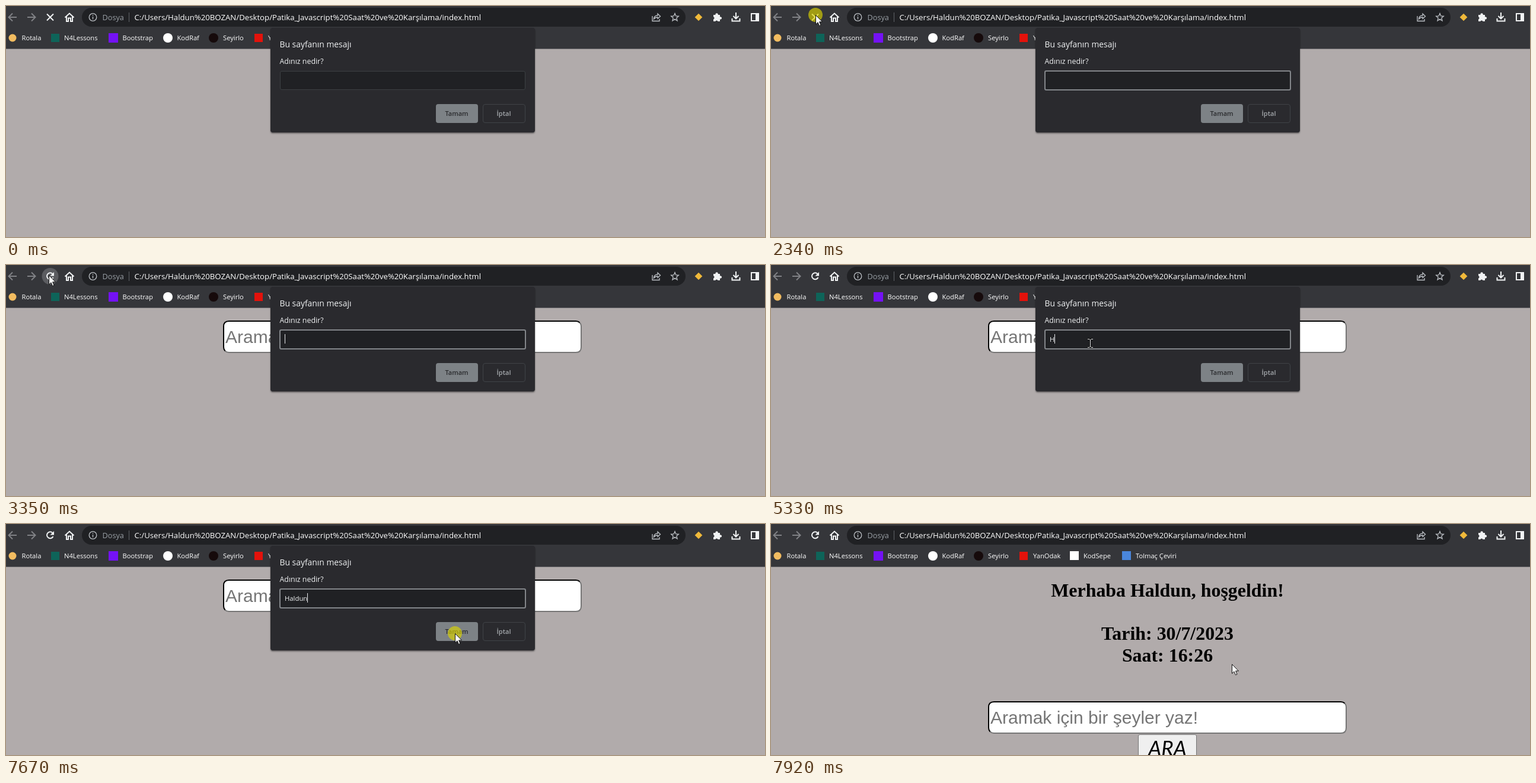
Recreate the animation shown at these times as an HTML page. Size 1280 px wide and 391 px high, loop 7990 ms.

```html
<!DOCTYPE html>
<html lang="tr">
<head>
<meta charset="utf-8">
<title>Saat ve Karşılama</title>
<style>
  html, body { margin: 0; width: 100%; height: 100%; overflow: hidden; background: #b1abab; }
  svg { display: block; font-family: "Open Sans", "Noto Sans", sans-serif; }
  .line { fill: none; stroke: #f1f3f4; stroke-width: 2; }
  .dim { stroke: #808185; }
  .thin { stroke: #bdc1c6; stroke-width: 1.3; }
  .dark { stroke: #000; }
  .gray { stroke: #767676; }
  .marks { font-size: 11.2px; fill: #fff; }
  .greet { font: bold 31.9px "Liberation Serif", serif; text-anchor: middle; }
  .btn { font-size: 11px; font-weight: 600; text-anchor: middle; }
</style>
</head>
<body>
<svg width="1280" height="391" viewBox="0 0 1280 391">
  <defs>
    <filter id="shadow" x="-5%" y="-5%" width="110%" height="115%">
      <feDropShadow dx="0" dy="1.5" stdDeviation="1.3" flood-opacity=".5"/>
    </filter>
  </defs>
  <rect width="1280" height="391" fill="#b1abab"/>

  <g id="page">
    <g id="greeting" class="greet">
      <text x="668.5" y="123">Merhaba Haldun, hoşgeldin!</text>
      <text x="668.5" y="196">Tarih: 30/7/2023</text>
      <text x="668.5" y="233">Saat: 16:26</text>
    </g>
    <g id="search">
      <rect x="367" y="95" width="603" height="53" rx="9" fill="#fff"/>
      <path class="line gray" d="M967.5 97.5Q970 100 970 104V139Q970 148 961 148H376Q372 148 369.5 145.5"/>
      <path class="line dark" d="M369.5 145.5Q367 143 367 139V104Q367 95 376 95H961Q965 95 967.5 97.5"/>
      <text x="370" y="132" font-size="30" fill="#757575" font-family="Liberation Sans, sans-serif">Aramak için bir şeyler yaz!</text>
      <rect x="619.5" y="150.5" width="98" height="48" rx="2.5" fill="#efefef" stroke="#767676"/>
      <text x="668.5" y="186" font-size="35" font-style="italic" text-anchor="middle" font-family="Lato, sans-serif">ARA</text>
    </g>
  </g>

  <g id="toolbar">
    <rect width="1280" height="72" fill="#35363a"/>
    <rect y="72" width="1280" height="1" fill="#67666a"/>
    <path class="line dim" d="M18 19H5M11 12.5L4.5 19L11 25.5M36 19H49M43 12.5L49.5 19L43 25.5"/>
    <circle id="hover" cx="74.5" cy="19" r="14" fill="#5b5c60"/>
    <path id="stop" class="line" d="M69 13.5L80 24.5M80 13.5L69 24.5"/>
    <g id="reload">
      <path class="line" d="M79.5 21A5.5 5.5 0 1 1 78.5 15"/>
      <path fill="#f1f3f4" d="M81 12V18.5H74.5Z"/>
    </g>
    <path class="line" d="M99.5 19.5L107 12.5L114.5 19.5M102 18V26H105V20.5H109V26H112V18"/>
    <rect x="128" y="3" width="1018" height="32" rx="16" fill="#202124"/>
    <circle class="line thin" cx="146.5" cy="19" r="6.3"/>
    <path class="line thin" d="M146.5 18V22.5M146.5 15V16.5"/>
    <text x="162.5" y="23.5" font-size="12.7" fill="#9aa0a6">Dosya</text>
    <rect x="207" y="11" width="1" height="16" fill="#5f6368"/>
    <text x="216.5" y="23.5" font-size="13.21" fill="#fff">C:/Users/Haldun%20BOZAN/Desktop/Patika_Javascript%20Saat%20ve%20Karşılama/index.html</text>
    <path class="line thin" d="M1090 17V25.5H1102V22M1092.5 22Q1093 16 1099 16V13L1103.5 17.5L1099 21.5V19Q1095 19 1092.5 22Z"/>
    <path class="line thin" d="M1128 12.5L1129.8 17L1134.3 17.3L1130.8 20.2L1132 25L1128 22.3L1124 25L1125.2 20.2L1121.7 17.3L1126.2 17Z"/>
    <rect x="1163.5" y="14.5" width="9" height="9" fill="#f0b93a" transform="rotate(45 1168 19)"/>
    <path fill="#f1f3f4" d="M1193 15H1196.5A2.2 2.2 0 1 1 1200.7 15H1204V18.5A2.2 2.2 0 1 1 1204 22.5V26H1200.5A2.2 2.2 0 0 0 1196.3 26H1193V22.5A2.2 2.2 0 0 0 1193 18.3Z"/>
    <path class="line" d="M1231 11V21M1226.5 17L1231 21.5L1235.5 17M1224.5 21V25.5H1237.5V21"/>
    <rect class="line" x="1257" y="13" width="12" height="12"/>
    <rect x="1264" y="13" width="5" height="12" fill="#f1f3f4"/>
    <circle cx="11" cy="54" r="6.5" fill="#f2bc60"/>
    <rect x="76" y="47" width="14" height="14" fill="#0e6459"/>
    <rect x="173" y="46" width="16" height="16" fill="#7412f5"/>
    <circle cx="273" cy="54" r="8" fill="#fff"/>
    <circle cx="350" cy="54" r="8" fill="#160a0b"/>
    <rect x="419" y="47" width="14" height="14" fill="#e3120b"/>
    <rect x="504" y="46" width="15" height="15" fill="#fff"/>
    <rect x="592" y="46" width="15" height="15" fill="#4a86dc"/>
    <g class="marks">
      <text x="26.5" y="58">Rotala</text>
      <text x="98" y="58">N4Lessons</text>
      <text x="196.5" y="58">Bootstrap</text>
      <text x="288.5" y="58">KodRaf</text>
      <text x="366" y="58">Seyirlo</text>
      <text x="442" y="58">YanOdak</text>
      <text x="527" y="58">KodSepe</text>
      <text x="615" y="58">Tolmaç Çeviri</text>
    </g>
  </g>

  <g id="dialog">
    <rect x="446" y="37" width="446" height="177" rx="4" fill="#292a2d" filter="url(#shadow)"/>
    <text x="461.5" y="69.5" font-size="13.87" fill="#f1f3f4">Bu sayfanın mesajı</text>
    <text x="461.5" y="97.5" font-size="12.4" fill="#f1f3f4">Adınız nedir?</text>
    <rect x="462.5" y="110.5" width="413" height="31" rx="2.5" fill="#202124" stroke="#3c4043"/>
    <rect id="ring" x="462" y="110" width="414" height="32" rx="2" fill="none" stroke="#83868a" stroke-width="2"/>
    <text id="typed" x="470" y="130" font-size="11.3" fill="#f1f3f4"></text>
    <rect id="caret" y="117" width="1" height="16" fill="#e8eaed"/>
    <rect x="725" y="166" width="71" height="32" rx="4" fill="#7d8286"/>
    <text class="btn" x="760" y="186" fill="#292a2d">Tamam</text>
    <rect x="804.5" y="166.5" width="71" height="31" rx="3.5" fill="none" stroke="#404347"/>
    <text class="btn" x="839.5" y="186" fill="#a6aaae">İptal</text>
  </g>

  <g id="pointer">
    <circle id="press" r="12" fill="#dcd400" opacity=".65"/>
    <path id="arrow" fill="#fff" stroke="#111" d="M.5 .5V16L4 12.7L6.5 18.5L9 17.4L6.6 11.8H11.5Z"/>
    <g id="beam" fill="none">
      <path stroke="#111" stroke-width="3" d="M-4 -6.5H4M-4 7.5H4M.5 -6V7"/>
      <path stroke="#e8eaed" d="M-4 -6.5H-1L.5 -5L2 -6.5H5M-4 7.5H-1L.5 6L2 7.5H5M.5 -5V6"/>
    </g>
  </g>
</svg>
<script>
const LOOP = 7990, NAME = "Haldun";
const $ = id => document.getElementById(id);
const show = (id, on) => $(id).style.display = on ? "" : "none";
const within = (t, ...spans) => spans.some(([a, b]) => t >= a && t < b);

const keyTimes = [5330, 5650, 5920, 6120, 6440, 6590];
const caretOn = [[3300, 3790], [4210, 4810], [5330, 7110], [7630, LOOP]];
const presses = [[2060, 2500], [3030, 3110], [7600, 7735]];

// time, x, y of the pointer tip
const path = [
  [450, 1035, 374], [650, 800, 330], [850, 540, 250], [1050, 300, 160],
  [1200, 162, 93], [1250, 129, 63], [1500, 100, 36], [1940, 75, 15],
  [2740, 75, 15], [2820, 72, 17], [3400, 72, 17], [3600, 290, 60],
  [3810, 505, 107], [3900, 538, 126], [4210, 540, 126], [4260, 538, 132],
  [7040, 538, 132], [7250, 640, 160], [7500, 757, 185], [7740, 757, 185],
  [7920, 777, 237], [LOOP, 777, 237]
];

function pointerAt(t) {
  const i = Math.max(1, path.findIndex(p => p[0] >= t));
  const [t0, x0, y0] = path[i - 1], [t1, x1, y1] = path[i];
  const k = Math.max(0, (t - t0) / (t1 - t0));
  return [x0 + (x1 - x0) * k, y0 + (y1 - y0) * k];
}

// 0 = dialog in place, 1 = lifted and gone
function liftAt(t) {
  if (t < 3098) return 0;
  if (t < 3245) return (t - 3098) / 147;
  if (t < 3340) return (3340 - t) / 95;
  return Math.min(1, Math.max(0, (t - 7750) / 160));
}

function draw(t) {
  const greeted = t >= 7800;
  show("page", t >= 3130);
  show("greeting", greeted);
  $("search").setAttribute("transform", `translate(0 ${greeted ? 206 : 0})`);

  show("stop", t < 3030);
  show("reload", t >= 3030);
  show("hover", within(t, [3030, 3430]));

  const lift = liftAt(t), dialog = $("dialog");
  show("dialog", lift < 1);
  dialog.setAttribute("opacity", 1 - lift * lift);
  dialog.setAttribute("transform",
    `translate(669 ${125.5 - 19 * lift}) scale(${1 + .02 * lift}) translate(-669 -125.5)`);
  show("ring", within(t, [2110, 2400], [3245, LOOP]));

  const typed = $("typed");
  typed.textContent = NAME.slice(0, keyTimes.filter(k => t >= k).length);
  show("caret", within(t, ...caretOn));
  $("caret").setAttribute("x", Math.round(470 + typed.getComputedTextLength()));

  const [x, y] = pointerAt(t), beam = within(t, [3860, 7130]);
  show("pointer", t >= 450);
  $("pointer").setAttribute("transform", `translate(${Math.round(x)} ${Math.round(y)})`);
  show("press", within(t, ...presses));
  show("arrow", !beam);
  show("beam", beam);
}

const start = performance.now();
function tick() {
  draw((performance.now() - start) % LOOP);
  requestAnimationFrame(tick);
}
tick();
</script>
</body>
</html>
```
